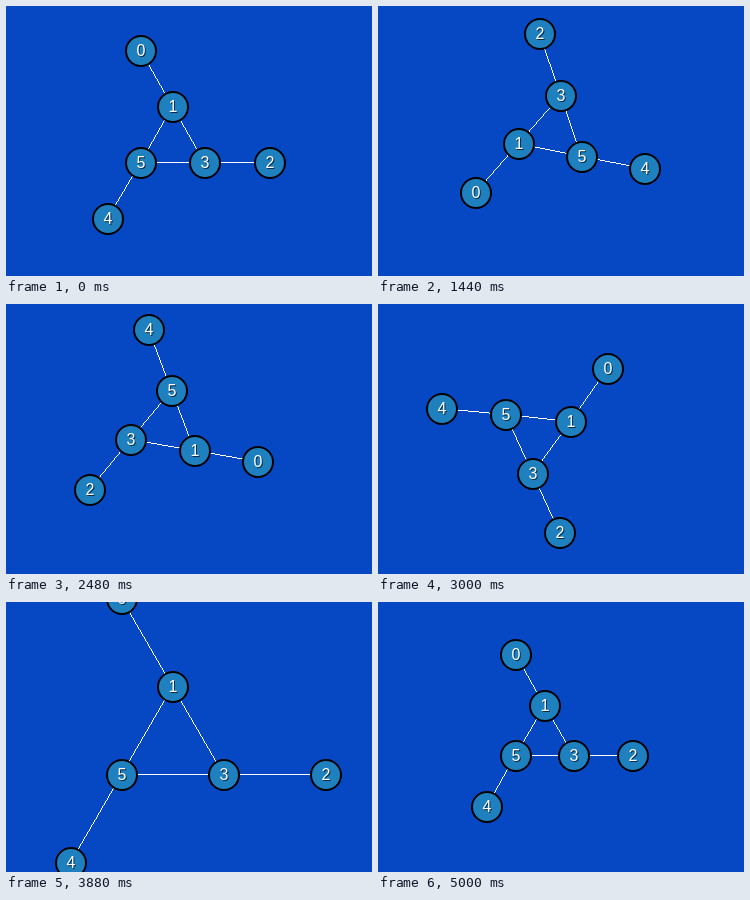
An HTML page for the animation above (5040 ms loop, 366x270 px).

```html
<!DOCTYPE html>
<html lang="en">
<head>
<meta charset="utf-8">
<title>Turning graph</title>
<style>
  html, body { margin: 0; width: 100%; height: 100%; overflow: hidden; background: #0648c4; }
  svg { display: block; width: 100vw; height: 100vh; }
  #edges { fill: #fff; shape-rendering: crispEdges; }
  circle { fill: #1e80be; stroke: #000; stroke-width: 2; }
  text { font: 16px "Liberation Sans", Arial, sans-serif; text-anchor: middle; }
  .shade { fill: #0a2c48; }
  .label { fill: #fff; }
</style>
</head>
<body>
<svg viewBox="0 0 366 270"><path id="edges"/><g id="nodes"></g></svg>
<script>
const LOOP = 5040, STEP = 40;
const PIVOT = { x: 167.05, y: 129.2 };
const SIDE = 64.6, HALF = SIDE / 2, RISE = SIDE * Math.sqrt(3) / 2, BASE = 27.9;

// Node offsets from the pivot, index = label
const points = [
  [-HALF, BASE - 2 * RISE],
  [0, BASE - RISE],
  [HALF + SIDE, BASE],
  [HALF, BASE],
  [-SIDE, BASE + RISE],
  [-HALF, BASE]
];
const links = [[0, 1], [1, 3], [3, 5], [5, 1], [3, 2], [5, 4]];

// [time in ms, value]
const turnKeys = [[0, 0], [528, 0], [920, 46.3], [1920, 166.5], [2480, 230.5], [3520, 358.5], [3530, 360], [LOOP, 360]];
const zoomKeys = [[0, 1], [3528, 1], [4100, 1.87], [4800, 0.82], [5000, 0.906], [LOOP, 1]];

const linear = u => u;
const soft = u => 0.75 * (1 - Math.cos(Math.PI * u)) / 2 + 0.25 * u;

function sample(keys, t, ease) {
  let i = 1;
  while (i < keys.length - 1 && t > keys[i][0]) i++;
  const [t0, a] = keys[i - 1], [t1, b] = keys[i];
  return a + (b - a) * ease((t - t0) / (t1 - t0));
}

function add(parent, tag, attrs, content) {
  const el = document.createElementNS("http://www.w3.org/2000/svg", tag);
  for (const name in attrs) el.setAttribute(name, attrs[name]);
  if (content !== undefined) el.textContent = content;
  return parent.appendChild(el);
}

// Hard-edged line, one pixel per step along its longer axis
function thinLine([x0, y0], [x1, y1]) {
  const n = Math.ceil(Math.max(Math.abs(x1 - x0), Math.abs(y1 - y0)));
  let d = "";
  for (let i = 0; i <= n; i++) {
    const x = Math.round(x0 + (x1 - x0) * i / n) - 1;
    const y = Math.round(y0 + (y1 - y0) * i / n) - 1;
    d += `M${x} ${y}h1v1h-1z`;
  }
  return d;
}

const edges = document.getElementById("edges");
const nodeLayer = document.getElementById("nodes");
const nodes = points.map((p, i) => {
  const g = add(nodeLayer, "g", {});
  add(g, "circle", { r: 15 });
  add(g, "text", { x: 1, y: 6, class: "shade" }, i);
  add(g, "text", { x: 0, y: 5, class: "label" }, i);
  return g;
});

function draw(time) {
  const t = Math.floor((time % LOOP) / STEP) * STEP;
  const angle = sample(turnKeys, t, linear) * Math.PI / 180;
  const zoom = sample(zoomKeys, t, soft);
  const c = Math.cos(angle) * zoom, s = Math.sin(angle) * zoom;
  const at = points.map(([x, y]) => [
    Math.round(PIVOT.x + x * c + y * s),
    Math.round(PIVOT.y - x * s + y * c)
  ]);

  edges.setAttribute("d", links.map(([a, b]) => thinLine(at[a], at[b])).join(""));
  nodes.forEach((g, i) => g.setAttribute("transform", `translate(${at[i]})`));
}

let start;
function tick(now) {
  if (start === undefined) start = now;
  draw(now - start);
  requestAnimationFrame(tick);
}
draw(0);
requestAnimationFrame(tick);
</script>
</body>
</html>
```
